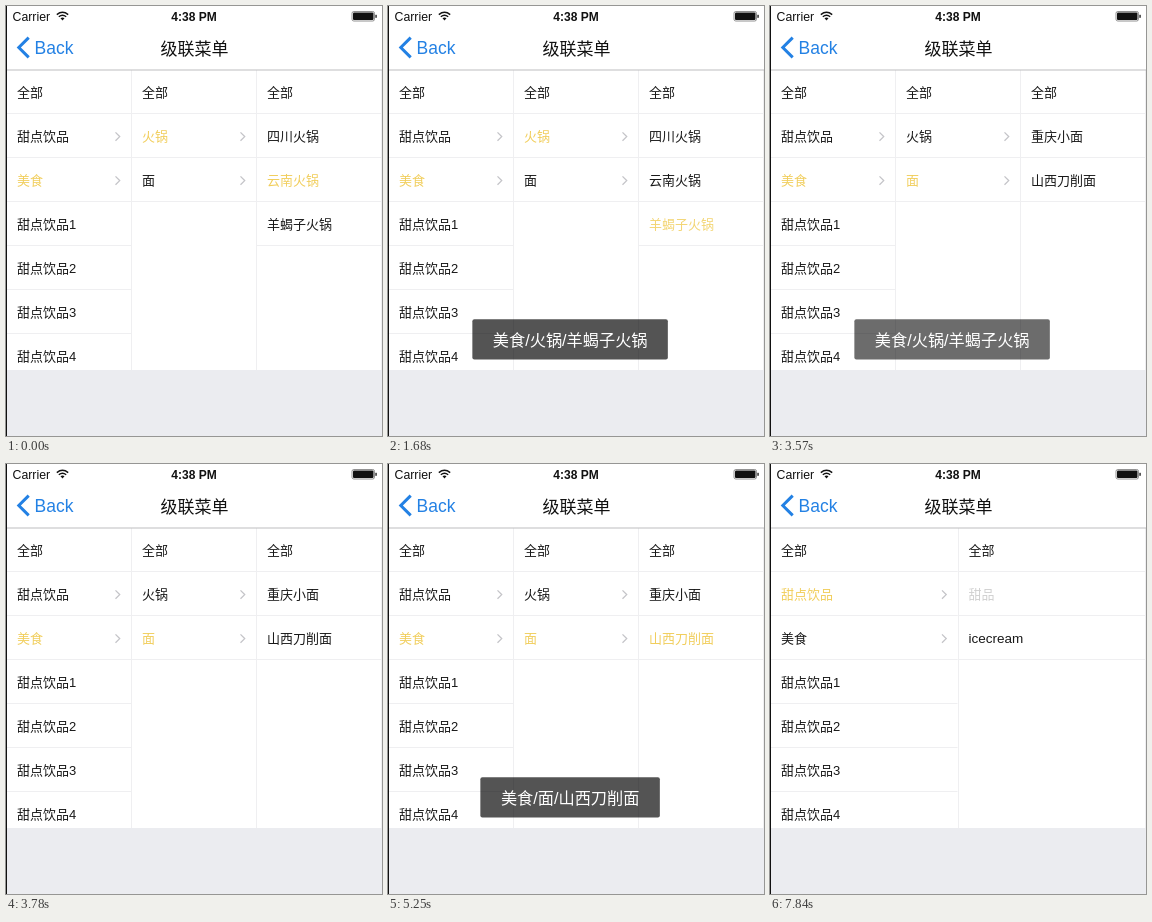
Write an HTML page that moves like this. It is 376 px wide and 430 px high and loops after 8000 ms.

```html
<!DOCTYPE html>
<html lang="zh-CN">
<head>
<meta charset="utf-8">
<style>
html, body { margin: 0; width: 100%; height: 100%; overflow: hidden; background: #fff; }
svg { display: block; width: 376px; height: 430px; font-family: "Liberation Sans", "Noto Sans CJK SC", "Noto Sans CJK", sans-serif; }
</style>
</head>
<body>
<svg viewBox="0 0 376 430">
  <rect width="376" height="430" fill="#fff"/>
  <g id="menu"></g>
  <rect y="364" width="376" height="66" fill="#ebecf0"/>
  <rect y="63.5" width="376" height="1" fill="#bebec0"/>
  <g fill="#111">
    <text x="6.5" y="14.5" font-size="12.3">Carrier</text>
    <text x="188" y="14.5" font-size="12" font-weight="bold" text-anchor="middle">4:38 PM</text>
    <text x="188.5" y="48.5" font-size="17" font-weight="500" text-anchor="middle">级联菜单</text>
    <path d="M54.5 12.2 L56.5 14.4 L58.5 12.2 Q56.5 10.6 54.5 12.2"/>
    <rect x="347" y="6.5" width="20.5" height="7.5" rx="1"/>
    <rect x="369.4" y="8.8" width="1.3" height="3"/>
  </g>
  <rect x="346" y="5.5" width="22.5" height="9.5" rx="1.8" fill="none" stroke="#777" stroke-width=".8"/>
  <path d="M50.8 8.6 Q56.5 4 62.2 8.6 M52.8 10.7 Q56.5 7.7 60.2 10.7" fill="none" stroke="#111" stroke-width="1.4"/>
  <path d="M22.7 31.6 L12.8 41.5 L22.7 51.4" fill="none" stroke="#2381e4" stroke-width="3"/>
  <text x="28.5" y="48" font-size="17.5" fill="#2381e4">Back</text>
  <g id="toast"></g>
  <rect width="1" height="430" fill="#111"/>
</svg>
<script>
const LOOP = 8000, STEP = 70, ROW = 44, TOP = 64, DELAY = 140;
const menu = document.getElementById('menu'), toast = document.getElementById('toast');
const clamp = v => Math.max(0, Math.min(1, v));

const groups = ['全部', '甜点饮品', '美食', ...[1, 2, 3, 4].map(n => '甜点饮品' + n)];
const foods = ['全部', '火锅', '面'];
const desserts = ['全部', '甜品', 'icecream'];
const hotpots = ['全部', '四川火锅', '云南火锅', '羊蝎子火锅'];
const noodles = ['全部', '重庆小面', '山西刀削面'];

// time, column, row
const taps = [[1400, 2, 3], [2520, 1, 2], [4340, 2, 2], [6510, 0, 1], [7840, 1, 1]];
// fade-in start, fade-out start, text, width
const toasts = [
  [1470, 3535, '美食/火锅/羊蝎子火锅', 195.5],
  [4410, 6490, '美食/面/山西刀削面', 179.5]
];

const line = (x, y, w, h) => `<rect x="${x}" y="${y}" width="${w}" height="${h}" fill="#efeff1"/>`;

function cell(text, x, y, right, arrow, color, opacity) {
  const size = /^[a-z]/.test(text) ? 13.5 : 13;
  const tip = right - 11.3;
  const chevron = arrow
    ? `<path d="M${tip - 4.2} ${y + 18.4} L${tip} ${y + 22.6} L${tip - 4.2} ${y + 26.8}" fill="none" stroke="#c4c4c8" stroke-width="1.3"/>` : '';
  return `<g opacity="${opacity}"><text x="${x + 11}" y="${y + 26.8}" font-size="${size}" fill="${color}">${text}</text>${chevron}</g>`;
}

function drawMenu(t) {
  const chosen = [2, 1, 2];
  let active = null;
  for (const [at, col, row] of taps) {
    if (t < at) break;
    active = { col, row, age: t - at };
    if (active.age >= DELAY) {
      chosen[col] = row;
      chosen.fill(-1, col + 1);
    }
  }
  const cols = chosen[0] === 1
    ? [groups, desserts]
    : [groups, foods, chosen[1] === 1 ? hotpots : noodles];
  const width = 375 / cols.length;
  return cols.map((rows, c) => {
    const x = c * width, right = x + width;
    const last = c === cols.length - 1;
    const cells = rows.map((text, r) => {
      const y = TOP + r * ROW;
      let opacity = 1;
      if (active && active.col === c && active.row === r) {
        const age = active.age - DELAY;
        opacity = age < 0 ? 0.2 : clamp(0.17 + 0.83 * age / 170);
      }
      const arrow = !last && (c ? r > 0 : r === 1 || r === 2);
      const color = chosen[c] === r ? '#f1ce5c' : '#181818';
      return cell(text, x, y, right, arrow, color, opacity) + line(x, y + ROW - 1, width, 1);
    });
    return cells.join('') + line(Math.round(right), TOP, 1, 300);
  }).join('');
}

function drawToast(t) {
  return toasts.map(([start, end, text, w]) => {
    const alpha = Math.min(clamp((t - start) / 195), clamp(1 - (t - end) / 245));
    return alpha ? `<g opacity="${alpha}">
      <rect x="${182.1 - w / 2}" y="313.2" width="${w}" height="40.4" rx="2" fill="#000" fill-opacity=".67"/>
      <text x="182.2" y="339.8" font-size="16.2" fill="#fff" text-anchor="middle">${text}</text></g>` : '';
  }).join('');
}

const begin = performance.now();
let shown = -1;
function tick() {
  const elapsed = (performance.now() - begin) % LOOP;
  const t = Math.min(Math.floor(elapsed / STEP) * STEP, 7840);
  if (t !== shown) {
    shown = t;
    menu.innerHTML = drawMenu(t);
    toast.innerHTML = drawToast(t);
  }
  requestAnimationFrame(tick);
}
tick();
</script>
</body>
</html>
```
